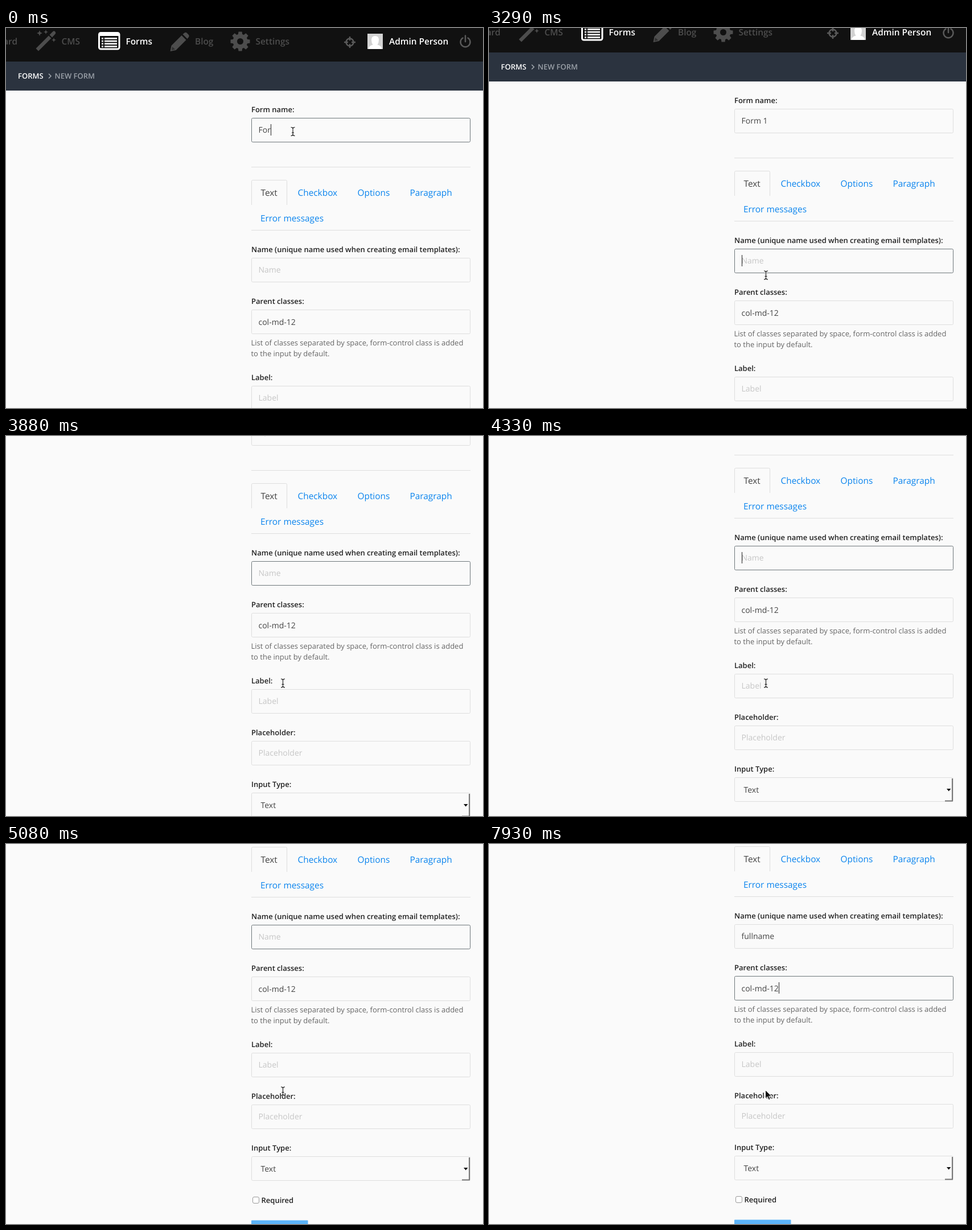
An HTML page for the animation above (8 s loop, 838 by 668 pixels).

```html
<!DOCTYPE html>
<html lang="en">
<head>
<meta charset="utf-8">
<title>New form</title>
<style>
html, body { margin: 0; width: 100%; height: 100%; overflow: hidden; background: #fafafa; }
svg { display: block; width: 838px; height: 668px; }
text { font-family: "Open Sans", sans-serif; white-space: pre; text-rendering: geometricPrecision; }
.nav { font-size: 15.4px; font-weight: 600; fill: #4d4d4d; }
.crumb, .label { font-size: 13px; font-weight: 600; }
.label { fill: #222; }
.help { font-size: 13px; fill: #666; }
.tab { font-size: 15.4px; fill: #0a84ee; }
.value { font-size: 14px; fill: #444; }
.hint { font-size: 14px; fill: #c6c6c6; }
.dark { fill: #444; }
.white { fill: #fff; }
.line { fill: none; stroke: #dedede; }
</style>
</head>
<body>
<svg viewBox="0 0 838 668">
  <defs>
    <path id="beamShape" d="M-3.500-7.500Q-.5-7.500 0-5.500Q.5-7.500 3.500-7.500M0-5.500V5.500M-3.500 7.500Q-.5 7.500 0 5.500Q.5 7.500 3.500 7.500M-2 2H2"/>
  </defs>
  <g id="page"></g>
  <g id="pointer" stroke-linejoin="round">
    <g id="beam" fill="none">
      <use href="#beamShape" stroke="#fff" stroke-width="2.6" opacity=".8"/>
      <use href="#beamShape" stroke="#111" stroke-width="1.1"/>
    </g>
    <path id="arrow" d="M0 0V15L3.5 11.8L6 17.3L8.6 16.2L6.2 10.8H11Z" fill="#111" stroke="#fff"/>
  </g>
</svg>
<script>
const LOOP = 8000, BLINK = 595;
const $ = id => document.getElementById(id);

const text = (x, y, cls, str, extra = '') => `<text x="${x}" y="${y}" class="${cls}" ${extra}>${str}</text>`;
const rect = (x, y, w, h, fill, extra = '') => `<rect x="${x}" y="${y}" width="${w}" height="${h}" fill="${fill}" ${extra}/>`;
const rule = y => rect(431, y, 385, 1, '#dedede');
const field = (y, label, id = '') => text(431, y - 10, 'label', label) +
  `<rect id="${id}" class="line" x="431.5" y="${y + .5}" width="384" height="42" rx="2"/>`;
const repeat = (n, fn) => Array.from({ length: n }, (_, i) => fn(i)).join('');
const star = (x, y, r) => {
  const q = r * .28;
  return `<path d="M${x} ${y - r}l${q} ${r - q} ${r - q} ${q} ${q - r} ${q} ${-q} ${r - q} ${-q} ${q - r} ${q - r} ${-q} ${r - q} ${-q}Z"/>`;
};

const icons = `
  <g fill="#4d4d4d">
    <path d="M52.5 36L75 13.5L79.5 18L57 40.5ZM76.5 12L82.5 6Q84 4.5 86 6L87 7.5Q88 9 86.5 10.5L81 16.5Z"/>
    ${star(59, 9, 5)}${star(70, 7, 4)}${star(84, 21, 4)}
    <path d="M288.5 41L290.5 31L308.5 13L316.5 21L298.5 39ZM310.5 11L313.5 8.5Q315.5 7 317.5 8.5L321 12Q322.5 14 321 16L318.5 19Z"/>
    <path d="M292 33L297 37.5L291 39Z" fill="#111" opacity=".5"/>
    ${repeat(8, i => `<path d="M407.5 13L408.5 6.5H414.5L415.5 13Z" transform="rotate(${i * 45} 411.5 23.5)"/>`)}
    <circle cx="411.5" cy="23.5" r="13"/>
    <circle cx="411.5" cy="23.5" r="5.5" fill="#111"/>
  </g>
  <rect x="163.5" y="8.5" width="35.5" height="28.5" rx="3" fill="none" stroke="#fff" stroke-width="3"/>
  ${rect(163, 8, 36, 6, '#fff')}
  ${repeat(4, i => rect(168, 17 + i * 4.7, 3, 2.7, '#fff') + rect(173, 17 + i * 4.7, 22, 2.7, '#fff'))}
  <g fill="none" stroke="#5a5a5a" stroke-width="2.5">
    <circle cx="604" cy="25" r="6.5"/>
    <path d="M604 15V22M604 28V35M594 25H601M607 25H614"/>
    <path d="M802.5 17.5A8.5 8.5 0 1 0 811.5 17.5M807 13.5V24" stroke-linecap="round"/>
  </g>
  ${rect(635, 10, 27, 27, '#d2d2d2')}
  <path d="M637 37Q637 31 644.5 29.5Q642 26 642 21Q642 14 648.5 14Q655 14 655 21Q655 26 652.5 29.5Q660 31 660 37Z" fill="#fff"/>`;

$('page').innerHTML = `
  ${rect(0, 0, 838, 59, '#111')}${rect(0, 59, 838, 51, '#2b333f')}
  ${icons}
  ${text(20, 28.5, 'nav', 'Dashboard', 'text-anchor="end"')}
  ${text(97.5, 28.5, 'nav', 'CMS')}
  ${text(210.5, 28.5, 'nav white', 'Forms')}
  ${text(332, 28.5, 'nav', 'Blog')}
  ${text(438.5, 28.5, 'nav', 'Settings')}
  ${text(673, 29, 'nav white', 'Admin Person')}
  ${text(21, 89, 'crumb', 'FORMS', 'fill="#fff"')}
  <path d="M75 80.5L79 84.5L75 88.5" fill="none" stroke="#a0a6ad" stroke-width="1.6"/>
  ${text(85.5, 89, 'crumb', 'NEW FORM', 'fill="#9aa0a8"')}

  ${field(158, 'Form name:', 'field0')}
  ${rule(244)}
  <path class="line" d="M431.5 311V269.5Q431.5 267.5 433.5 267.5H491.5Q493.5 267.5 493.5 269.5V311"/>
  ${text(447.5, 295, 'tab dark', 'Text')}
  ${text(512.5, 295, 'tab', 'Checkbox')}
  ${text(617.5, 295, 'tab', 'Options')}
  ${text(709.5, 295, 'tab', 'Paragraph')}
  ${text(447, 340, 'tab', 'Error messages')}
  ${rule(355)}
  ${field(404, 'Name (unique name used when creating email templates):', 'field1')}
  ${field(495, 'Parent classes:', 'field2')}
  ${text(430.5, 558, 'help', 'List of classes separated by space, form-control class is added')}
  ${text(430.5, 577, 'help', 'to the input by default.')}
  ${field(629, 'Label:')}${text(443.5, 655, 'hint', 'Label')}
  ${field(720, 'Placeholder:')}${text(443.5, 746, 'hint', 'Placeholder')}
  ${field(811, 'Input Type:')}${text(447.5, 838, 'value', 'Text')}
  <path d="M814 813V852.5H801" fill="none" stroke="#777" stroke-width="2"/>
  <path d="M804 831H811.5L807.7 835.5Z" fill="#111"/>
  <rect x="433.5" y="882.5" width="11" height="11" rx="2.5" fill="#fff" stroke="#999"/>
  ${text(448.5, 892.5, 'label', 'Required')}
  ${rect(431, 923.5, 99.5, 43, '#5bb3f8', 'rx="1"')}

  <rect id="selection" x="444" y="506" width="65" height="20" fill="#b5d5fd"/>
  ${text(443.5, 184, 'value', '', 'id="value0"')}
  ${text(443.5, 430, 'hint', 'Name', 'id="nameHint"')}
  ${text(443.5, 430, 'value', '', 'id="value1"')}
  ${text(443.5, 521.5, 'value', 'col-md-12', 'id="value2"')}
  <rect id="caret" width="1" height="20" fill="#222"/>`;

// Tracks: [start time, value], each held until the next entry.
const scroll = [[0, 0], [3290, 16], [3440, 62], [3590, 116], [3730, 156], [3880, 184], [4030, 198],
  [4180, 206], [4330, 211], [4480, 225], [4630, 238], [4780, 249], [4930, 257], [5080, 262], [5230, 263]];
const pointer = [[0, [504, 182]], [1650, [505, 182]], [1800, [524, 189]], [1950, [555, 213]], [2100, [578, 256]],
  [2250, [582, 310]], [2400, [562, 366]], [2540, [520, 414]], [2690, [486.5, 434.5]], [5230, [485.5, 432.5]]];
const isArrow = [[0, false], [1950, true], [2540, false], [5230, true]];
const focus = [[0, 0], [2840, 1], [7480, 2]];
const formName = [[0, 'For'], [150, 'Form'], [600, 'Form '], [1050, 'Form 1']];
const typed = (word, ...times) => times.map((t, i) => [t, word.slice(0, i + 1)]);
const inputName = [[0, ''], ...typed('fullname', 5680, 5830, 5980, 6130, 6430, 6580, 6730, 6880)];
const selected = [[0, false], [7480, true], [7930, false]];
const caretTop = [169, 415, 506];

const entry = (track, t) => track.findLast(([start]) => start <= t);
const at = (track, t) => entry(track, t)[1];
const show = (id, on) => $(id).style.display = on ? '' : 'none';

function draw(now) {
  const t = now % LOOP, active = at(focus, t), name = at(inputName, t);
  $('page').setAttribute('transform', `translate(0 ${-at(scroll, t)})`);
  $('value0').textContent = at(formName, t);
  $('value1').textContent = name;
  show('nameHint', !name);
  show('selection', at(selected, t));

  const fading = t >= 2840 && t < 2990;
  for (let i = 0; i < 3; i++)
    $('field' + i).style.stroke = fading && i < 2 ? '#a6abad' : i === active ? '#6e777b' : '#dedede';

  const lastInput = Math.max(...[focus, formName, inputName, selected].map(track => entry(track, t)[0]));
  const lit = Math.floor((t - lastInput) / BLINK) % 2 === 0;
  show('caret', lit && !at(selected, t));
  $('caret').setAttribute('x', Math.round(444 + $('value' + active).getComputedTextLength()));
  $('caret').setAttribute('y', caretTop[active]);

  $('pointer').setAttribute('transform', `translate(${at(pointer, t)})`);
  show('arrow', at(isArrow, t));
  show('beam', !at(isArrow, t));
}

const begin = performance.now();
function tick() {
  draw(performance.now() - begin);
  requestAnimationFrame(tick);
}
draw(0);
tick();
</script>
</body>
</html>
```
